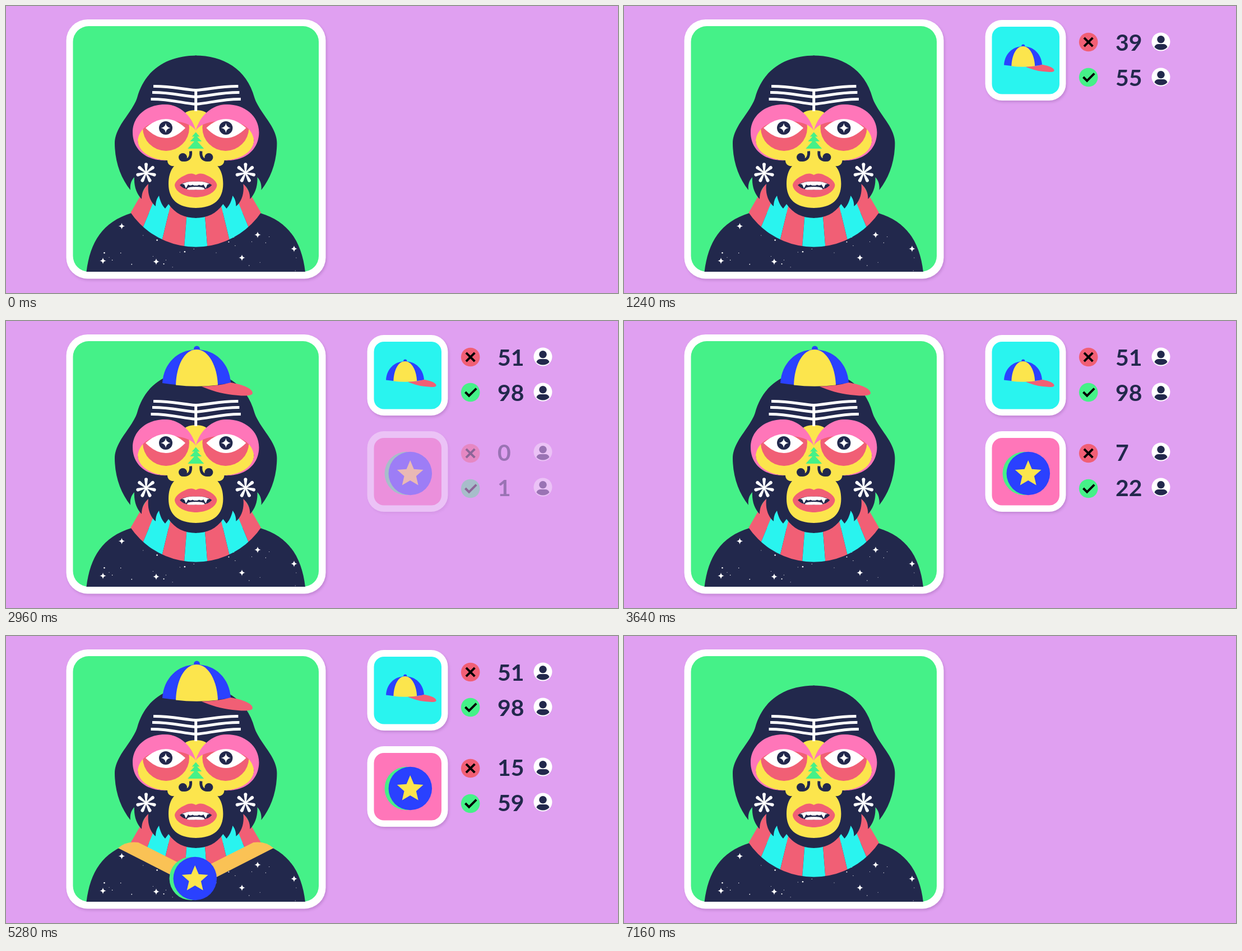
An HTML page for the animation above (7.32 s loop, 1092 px wide and 513 px high).

```html
<!DOCTYPE html>
<html lang="en">
<head>
<meta charset="utf-8">
<title>Avatar vote</title>
<style>
  html, body { margin: 0; height: 100%; overflow: hidden; background: #e0a0f1; }
  svg { display: block; width: 100%; height: 100%; }
  .frame { fill: #fff; filter: drop-shadow(2px 3px 2px rgba(90, 40, 110, .2)); }
  text { font: 700 41px Lato, sans-serif; fill: #22284c; }
  .navy { fill: #22284c; } .white { fill: #fff; } .green { fill: #45f188; }
  .red { fill: #f15f75; } .cyan { fill: #29f4ef; } .pink { fill: #ff76b9; }
  .yellow { fill: #fce54d; } .blue { fill: #2a41ff; } .orange { fill: #fac255; }
  .line { fill: none; stroke: #fff; stroke-width: 5; }
  .mark { fill: none; stroke: #000; stroke-width: 4; }
  .hook { fill: none; stroke: #22284c; stroke-width: 5; }
</style>
</head>
<body>
<svg viewBox="0 0 1092 513">
  <defs>
    <clipPath id="collar"><circle cx="338.7" cy="290" r="140.8"/></clipPath>
    <path id="spark" class="white" d="M0-1Q.12-.12 1 0Q.12.12 0 1Q-.12.12-1 0Q-.12-.12 0-1Z"/>
    <g id="flower" class="white"></g>

    <g id="cap">
      <circle class="blue" cx="340.5" cy="50" r="5.5"/>
      <path class="blue" d="M279 111C281 76 306 51 340 51S399 76 401 111Q340 120 279 111Z"/>
      <path class="yellow" d="M303 114.5C304 80 318 51 340 51S377 82 378 114.5Q340 119 303 114.5Z"/>
      <path class="red" d="M349 117Q380 116 401 110C424 114 440 121 440 129C439 135 420 134 404 132C385 130 365 124 349 117Z"/>
    </g>

    <g id="medal">
      <circle class="green" cx="330.3" cy="433.5" r="38.8"/>
      <circle class="blue" cx="337.3" cy="433.5" r="38.8"/>
      <polygon id="star" class="yellow"/>
    </g>

    <g id="person">
      <circle class="white" cx="958" cy="64" r="16.5"/>
      <circle class="navy" cx="958" cy="59.8" r="6.8"/>
      <path class="navy" d="M946.5 73.5Q948 68 954 68H962Q968 68 969.5 73.5Q965 78.5 958 78.5T946.5 73.5Z"/>
    </g>
  </defs>

  <rect width="1092" height="513" fill="#e0a0f1"/>
  <rect class="frame" x="107.5" y="24" width="463" height="463.5" rx="38"/>
  <rect class="green" x="119.5" y="36" width="438.5" height="439" rx="28"/>

  <g class="mirrored">
    <path class="navy" d="M143.5 475C150 422 172 386 224 370H340V475Z"/>
  </g>
  <g id="sky"></g>
  <g id="scarf" clip-path="url(#collar)"></g>

  <g class="mirrored">
    <path class="navy" d="M340 88.5C290 88.5 248 112 234 164C229 180 212 200 204 214C197 226 194 236 194 245
      C194 278 205 308 222 329C221 320 223 312 229 306C228 322 233 336 242 345C242 333 246 325 254 318
      C252 335 257 350 267 358C267 350 269 344 273 339C275 349 279 357 284 362L290 354C302 371 318 379 340 379Z"/>
    <path class="line" d="M263 143.5C295 143 315 149 339 150.5M261 154.5C293 154 315 161 339 162.5M258.500 166.500C293 166 315 174 339 175.5"/>
    <path class="yellow" d="M340 186C325 186 318 190 310 200L260 205C240 215 235 228 235 240C235 262 260 276 288 276
      C288 283 294 287 300 286C293 294 290 305 290 318C290 345 306 361 340 361Z"/>
    <circle class="red" cx="285.5" cy="217.5" r="41.5"/>
    <path class="pink" d="M338.700 223C332 211 312 205 285 205C260 205 238 217 235 240C236 260 258 275 288 276
      C250 278 226 256 226 226C226 196 252 176 283 176C310 176 332 196 338.7 223Z"/>
    <path class="white" d="M249 218Q267 202 285 202T320 218Q303 236 285 236T249 218Z"/>
    <circle class="navy" cx="285" cy="218" r="12"/>
    <use href="#spark" transform="translate(285 218) scale(8.5)"/>
    <circle class="navy" cx="315.5" cy="270.5" r="7.5"/>
    <path class="hook" d="M329.5 259.5Q331 276 317 275.5"/>
    <use href="#flower" x="250" y="298.3"/>
    <path class="red" d="M340 303Q334 298 326 300C316 303 302 311 301 320C302 333 320 342 340 342Z"/>
    <path class="navy" d="M340 314C330 313 318 314 310 320C316 327 325 329 340 328Z"/>
    <path class="white" d="M340 314C330 313 322 314 314 318L318 319L321 326L325 319Q329 322 333 319.5Q336 322 340 320Z"/>
    <path class="white" d="M340 323.5Q330 322.5 324 325L323 328Q332 329 340 328Z"/>
  </g>
  <path class="line" d="M338.7 148.5V188"/>
  <path class="green" d="M338.7 225.5l7 8h-14zM338.7 231l10.5 11h-21zM338.7 239l14.5 16h-29z"/>

  <use id="hat" href="#cap"/>
  <g id="chain">
    <g class="mirrored"><path class="orange" d="M200 379Q214 366 236 369L339 421V450Z"/></g>
    <use href="#medal"/>
  </g>
  <g id="rows"></g>
</svg>
<script>
const LOOP = 7320, STEP = 40, FADE_OUT = 7000;
const AXIS = 338.7;
const $ = id => document.getElementById(id);
const clamp = v => Math.max(0, Math.min(1, v));
const repeat = (n, make) => Array.from({ length: n }, (_, i) => make(i));

// Each shape is followed by its own mirror image, so the halves join without a seam.
for (const group of document.querySelectorAll('.mirrored')) {
  group.innerHTML = [...group.children].map(({ outerHTML: shape }) =>
    `${shape}<g transform="translate(${2 * AXIS}) scale(-1 1)">${shape}</g>`).join('');
}

$('flower').innerHTML = repeat(7, i =>
  `<path d="M-1 0L-3-15A3 3 0 0 1 3-15L1 0Z" transform="rotate(${i * 360 / 7})"/>`).join('');

$('star').setAttribute('points', repeat(10, i => {
  const angle = i * Math.PI / 5, radius = i % 2 ? 11.2 : 24.6;
  return [337.2 + radius * Math.sin(angle), 434.7 - radius * Math.cos(angle)];
}).join(' '));

// Scarf stripes fan out from a point on the forehead.
const fan = degrees => AXIS + 300 * Math.tan(Math.max(-30, Math.min(30, degrees)) * Math.PI / 180);
$('scarf').innerHTML = repeat(7, i => {
  const middle = (i - 3) * 9;
  return `<path class="${i % 2 ? 'cyan' : 'red'}" d="M${AXIS} 168L${fan(middle - 4.5)} 468H${fan(middle + 4.5)}Z"/>`;
}).join('');

let seed = 7;
const random = () => (seed = seed * 16807 % 2147483647) / 2147483647;
const sparkles = [[206.5, 393.5], [173, 455.5], [268, 457], [421, 450], [449, 409], [514, 434]];
$('sky').innerHTML =
  sparkles.map(([x, y]) => `<use href="#spark" transform="translate(${x} ${y}) scale(5.7)"/>`).join('') +
  repeat(34, () => {
    const angle = random() * Math.PI, reach = Math.sqrt(random());
    return `<circle class="white" cx="${AXIS + 185 * reach * Math.cos(angle)}"
      cy="${473 - 95 * reach * Math.sin(angle)}" r="${.5 + random() ** 3}"/>`;
  }).join('');

const rows = [
  { start: 160, no: 51, yes: 98, y: 0, lift: 0, fill: 'cyan',
    art: '<use href="#cap" transform="translate(522.6 43.6) scale(.557)"/>' },
  { start: 2920, no: 15, yes: 59, y: 172, lift: -2, fill: 'pink',
    art: '<use href="#medal" x="384" y="-333"/>' }
];

$('rows').innerHTML = rows.map(r => `<g transform="translate(0 ${r.y})">
  <g>
    <rect class="frame" x="644.5" y="25" width="144" height="144" rx="30"/>
    <rect class="${r.fill}" x="656.5" y="37" width="120.5" height="120.5" rx="18"/>
    ${r.art}
  </g>
  <circle class="red" cx="828.7" cy="64.5" r="16.8"/>
  <path class="mark" d="M821 56.8l15.4 15.4m0-15.4l-15.4 15.4"/>
  <circle class="green" cx="828.7" cy="127.5" r="16.8"/>
  <path class="mark" d="M819.5 127l6.7 6.7l13-13"/>
  <g transform="translate(0 ${r.lift})">
    <text x="877" y="79.5"></text><text x="877" y="142.5"></text>
    <use href="#person"/><use href="#person" y="63"/>
  </g>
</g>`).join('');

rows.forEach((r, i) => {
  r.group = $('rows').children[i];
  r.card = r.group.children[0];
  [r.noText, r.yesText] = r.group.querySelectorAll('text');
});

const count = (total, elapsed, duration) => Math.floor(total * clamp(elapsed / duration));

function draw(now) {
  const t = Math.floor(now % LOOP / STEP) * STEP;
  const fade = 1 - clamp((t - FADE_OUT) / 160);
  for (const r of rows) {
    const u = t - r.start;
    const scale = 1 + .18 * Math.sin(Math.PI * clamp((u - 1900) / 380));
    r.group.setAttribute('opacity', clamp(u / 110) * fade);
    r.card.setAttribute('transform', `translate(716.7 97) scale(${scale}) translate(-716.7 -97)`);
    r.noText.textContent = count(r.no, u, 1400);
    r.yesText.textContent = count(r.yes, u, 1896);
  }
  $('hat').setAttribute('opacity', t >= 2680 ? fade : 0);
  $('chain').setAttribute('opacity', t >= 5280 ? fade : 0);
}

const begin = performance.now();
(function tick() {
  draw(performance.now() - begin);
  requestAnimationFrame(tick);
})();
</script>
</body>
</html>
```
